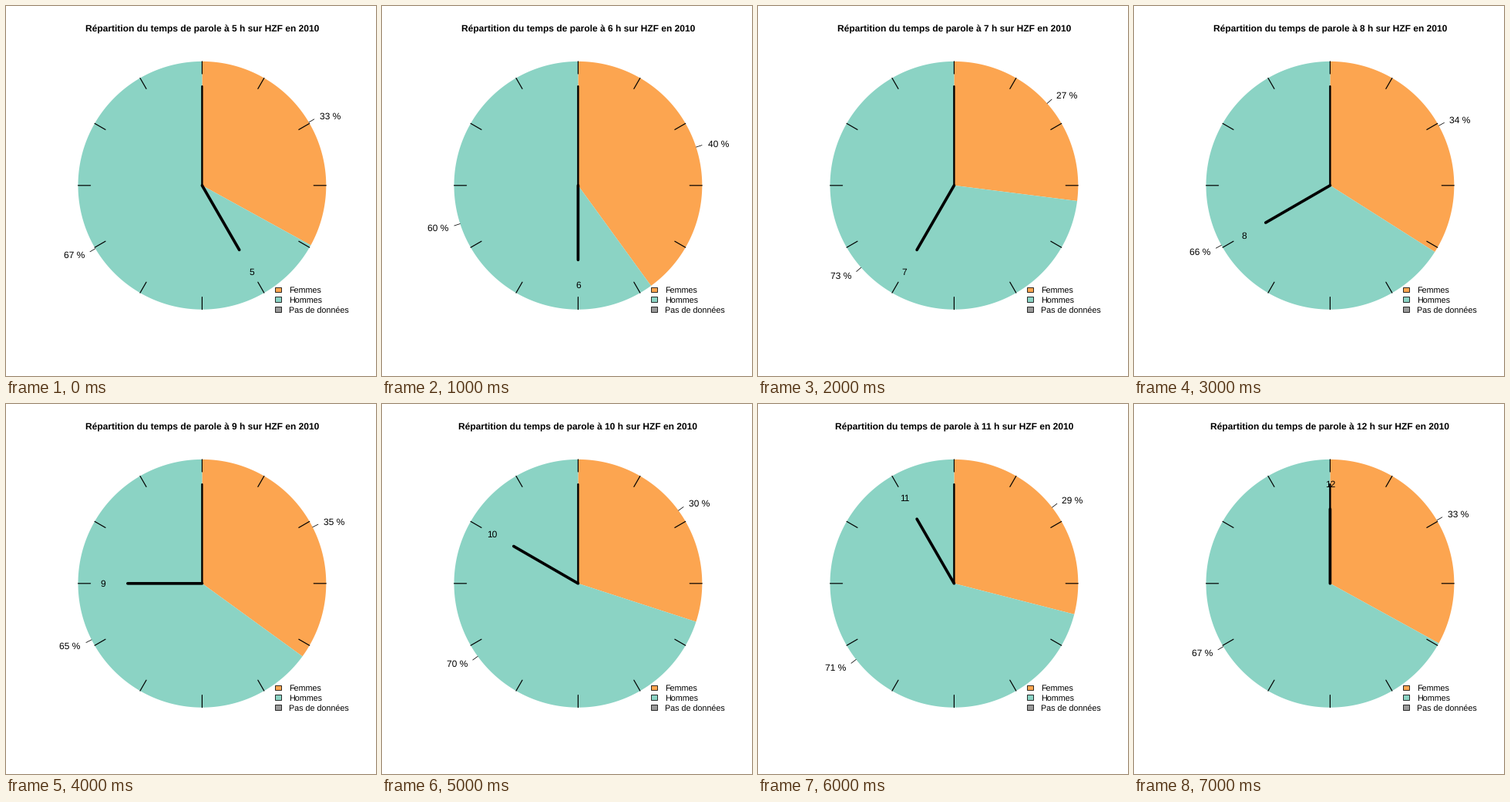
These frames come from a looping animation (480x480 px, 8 s). A matplotlib script:

```python
import numpy as np
import matplotlib.pyplot as plt
from matplotlib.animation import FuncAnimation
from matplotlib.patches import Polygon, Rectangle

plt.rcParams["font.family"] = "Liberation Sans"
plt.rcParams["text.hinting"] = "none"

SIZE, DPI = 480, 80
PT = 72 / DPI                      # points per pixel
CX, CY, R = 254.4, 232.8, 160.9
ORANGE, TEAL, GREY = "#FCA550", "#8BD3C4", "#999999"
FIRST_HOUR = 5
WOMEN = [33, 40, 27, 34, 35, 30, 29, 33]   # percent, one value per hour

fig = plt.figure(figsize=(SIZE / DPI, SIZE / DPI), dpi=DPI, facecolor="white")
ax = fig.add_axes([0, 0, 1, 1])
ax.set_xlim(0, SIZE)
ax.set_ylim(SIZE, 0)
ax.axis("off")


def polar(turn, r):
    """Point at a clockwise fraction of a turn from twelve o'clock."""
    a = 2 * np.pi * np.asarray(turn)
    return CX + r * R * np.sin(a), CY - r * R * np.cos(a)


def sector(start, end, color):
    x, y = polar(np.linspace(start, end, 200), 1)
    points = np.column_stack([np.append(x, CX), np.append(y, CY)])
    return ax.add_patch(Polygon(points, facecolor=color, linewidth=0, snap=False))


def spoke(turn, r0, r1, width):
    (x0, y0), (x1, y1) = polar(turn, r0), polar(turn, r1)
    return ax.plot([x0, x1], [y0, y1], color="black", lw=width * PT,
                   solid_capstyle="round", snap=False, zorder=3)[0]


def label(x, y, text, ha="center", size=12, weight="normal"):
    return ax.text(x, y + 0.36 * size, text, ha=ha, va="baseline",
                   fontsize=size * PT, weight=weight, color="black", zorder=4)


def share(start, end, percent):
    mid = (start + end) / 2
    x, y = polar(mid, 1.1)
    return [spoke(mid, 1, 1.05, 0.75),
            label(x, y, f"{percent} %", "right" if x < CX else "left")]


def draw_fixed():
    for k in range(12):
        spoke(k / 12, 0.9, 1, 1.2)
    spoke(0, 0, 0.8, 2.4)
    rows = [("Femmes", ORANGE), ("Hommes", TEAL), ("Pas de données", GREY)]
    for i, (name, color) in enumerate(rows):
        y = 367.8 + 12.96 * i
        ax.add_patch(Rectangle((349.2, y - 3.3), 7.8, 6.6, facecolor=color,
                               edgecolor="black", lw=0.8 * PT, zorder=3))
        label(366.8, y + 0.3, name, "left", 10.8)


moving = []


def clear():
    while moving:
        moving.pop().remove()
    return []


def draw(i):
    clear()
    hour, women = FIRST_HOUR + i, WOMEN[i]
    cut = women / 100
    moving.extend([
        sector(0, cut, ORANGE),
        sector(cut, 1, TEAL),
        spoke(hour / 12, 0, 0.6, 3.7),
        label(*polar(hour / 12, 0.8), str(hour)),
        label(CX, 29.5, f"Répartition du temps de parole à {hour} h sur HZF en 2010",
              weight="bold"),
        *share(0, cut, women),
        *share(cut, 1, 100 - women),
    ])
    return moving


draw_fixed()
anim = FuncAnimation(fig, draw, frames=len(WOMEN), init_func=clear,
                     interval=1000, repeat=True, repeat_delay=0, blit=False)
plt.show()
```
